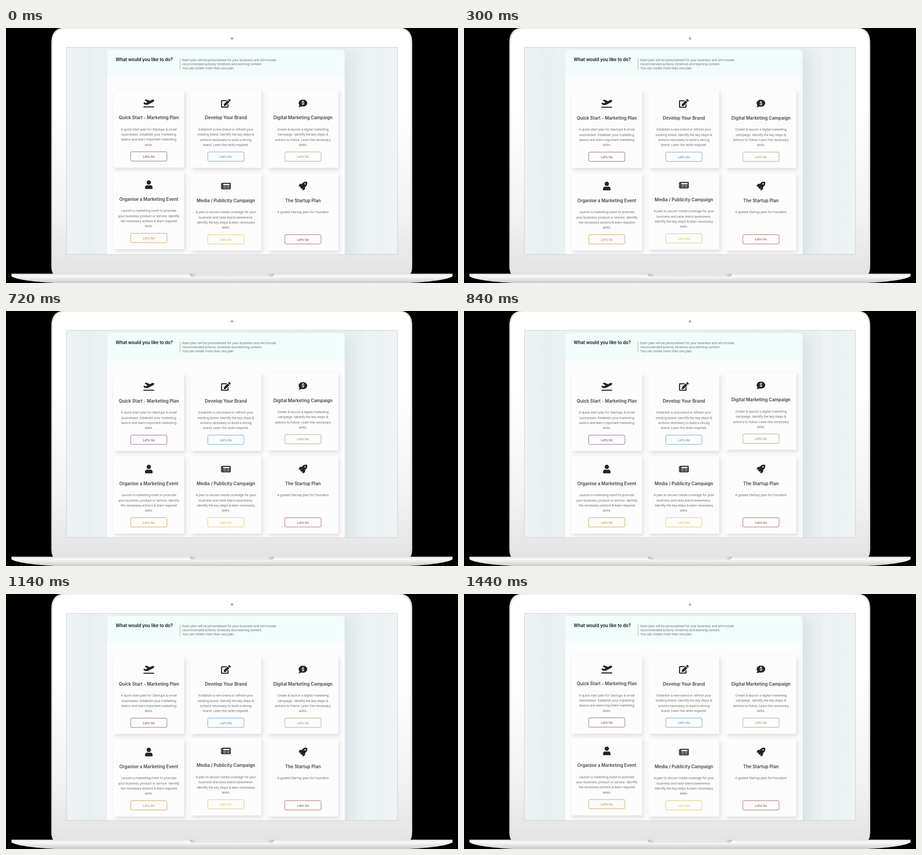
An HTML page that plays this animation: 997 px wide and 562 px high, repeating every 1.5 s.

```html
<!DOCTYPE html>
<html lang="en">
<head>
<meta charset="utf-8">
<title>Plan chooser on a laptop</title>
<style>
html, body { margin: 0; width: 100%; height: 100%; overflow: hidden; background: #000; }
svg { display: block; width: 997px; height: 562px; }
text { font-family: Roboto, sans-serif; }
.heading { font: 600 9.75px Inter, sans-serif; fill: #444; }
.body { font-size: 7.45px; font-weight: 300; fill: #333; }
.go { font-size: 7.4px; font-weight: 500; }
.card text { text-anchor: middle; }
.sheet { fill: #fcfcfc; filter: drop-shadow(3px 4px 4px rgba(80, 50, 55, .16)); }
.panel { filter: drop-shadow(12px 8px 14px rgba(90, 120, 130, .13)); }
</style>
</head>
<body>
<svg viewBox="0 0 997 562">
  <defs>
    <linearGradient id="lid" x2="0" y2="1">
      <stop offset=".3" stop-color="#fff"/><stop offset=".75" stop-color="#f3f3f3"/><stop offset="1" stop-color="#e3e3e3"/>
    </linearGradient>
    <linearGradient id="base" x2="0" y2="1">
      <stop stop-color="#e2e2e2"/><stop offset=".25" stop-color="#fafafa"/><stop offset=".45" stop-color="#efefef"/><stop offset="1" stop-color="#c9c9c9"/>
    </linearGradient>
    <linearGradient id="notch">
      <stop stop-color="#bdbdbd"/><stop offset=".08" stop-color="#e6e6e6"/><stop offset=".92" stop-color="#e6e6e6"/><stop offset="1" stop-color="#bdbdbd"/>
    </linearGradient>
    <linearGradient id="wall">
      <stop stop-color="#eff3f5"/><stop offset=".07" stop-color="#e9eff1"/><stop offset=".12" stop-color="#eef2f4"/>
      <stop offset=".9" stop-color="#ebf0f2"/><stop offset=".901" stop-color="#eff3f4"/><stop offset=".95" stop-color="#ecf1f3"/><stop offset="1" stop-color="#f0f4f5"/>
    </linearGradient>
    <clipPath id="screen"><path d="M134 43H863V498.5H134z"/></clipPath>
  </defs>

  <path d="M100 32Q100-1 132-1H864Q896-1 896 32V525Q896 540 889 545H107Q100 540 100 525z" fill="#dedede"/>
  <path d="M103 33Q103 1 134 1H862Q893 1 893 33V526Q893 538 888 543H108Q103 538 103 526z" fill="url(#lid)"/>
  <circle cx="498.5" cy="23" r="3.2" fill="#ddd"/>
  <circle cx="498.5" cy="23" r="1.8" fill="#8c8c8c"/>
  <path d="M12 541.5H985V547Q972 557 890 562H107Q25 557 12 547z" fill="url(#base)"/>
  <path d="M405 541.5H591Q591 548 584 548H412Q405 548 405 541.5z" fill="url(#notch)"/>

  <path d="M133.5 42.5H863.5V499H133.5z" fill="url(#wall)" stroke="#c9cfd0"/>
  <g clip-path="url(#screen)">
    <path class="panel" d="M223 520V58Q223 48 233 48H737Q747 48 747 58V520z" fill="#fcfcfc"/>
    <path d="M223 108V58Q223 48 233 48H737Q747 48 747 58V108z" fill="#f2fcfb"/>
    <text class="heading" x="242" y="73" style="fill:#161616">What would you like to do?</text>
    <path d="M384 67V92" stroke="#c99a98"/>
    <g class="body">
      <text x="389" y="72.6">Each plan will be personalised for your business and will include</text>
      <text x="389" y="82">recommended actions, timelines and learning content.</text>
      <text x="389" y="91.4">You can create more than one plan.</text>
    </g>
    <g id="cards"></g>
  </g>
</svg>
<script>
const LOOP = 1500;

// Icons are drawn on a 512-unit high grid.
const bar = (x, y, w, h) => `M${x} ${y}v${h}h${w}v${-h}z`;
const icons = {
  plane: [640, 'M624 448H16c-9 0-16 7-16 16v32c0 9 7 16 16 16h608c9 0 16-7 16-16v-32c0-9-7-16-16-16zM80.5 341.3c6.3 6.8 15.1 10.7 24.4 10.7l130.5-.2a66 66 0 0 0 29.6-7.1L556 197c26.800-13.500 50.700-32.900 67-58.300 18.300-28.500 20.300-49.100 13.100-63.700-7.200-14.500-24.700-25.200-58.300-27.400-29.800-2-59.500 5.900-86.200 19.400L393 117 174.400 35a18 18 0 0 0-18-1.100L90.600 67.300c-10.600 5.400-13.200 19.600-5.100 28.500l156.200 98.100-103.200 52.400-72.400-36.500a18 18 0 0 0-16 0L9.900 230.200c-10.400 5.300-13.200 19.100-5.600 28.100z'],
  edit: [576, 'M402.600 83.200l90.200 90.200c3.800 3.800 3.800 10 0 13.800L274.400 405.600l-92.800 10.300c-12.400 1.400-22.900-9.100-21.500-21.500l10.300-92.800L388.800 83.200c3.800-3.800 10-3.800 13.800 0zm162-22.900l-48.800-48.800c-15.200-15.200-39.900-15.200-55.200 0l-35.400 35.400c-3.800 3.800-3.800 10 0 13.800l90.200 90.200c3.800 3.800 10 3.800 13.800 0l35.400-35.400c15.200-15.300 15.200-40 0-55.200zM384 346V448H64V128h230c3 0 6-1 8.300-3.500l40-40c7.600-7.600 2-20.500-8.500-20.500H48C21.500 64 0 85.500 0 112v352c0 26.500 21.500 48 48 48h352c26.500 0 48-21.500 48-48V306c0-10.700-13-16-20.500-8.500l-40 40c-2.200 2.300-3.500 5.300-3.500 8.500z'],
  chat: [512, 'M256 32C115 32 0 125 0 240c0 48 20 92 53 127-14 52-45 85-49 90-9 9-4 23 9 23 62 0 113-25 142-45 31 9 65 13 101 13 141 0 256-93 256-208S397 32 256 32z'],
  user: [448, 'M224 256a128 128 0 1 0 0-256 128 128 0 0 0 0 256zm90 32h-17c-46 21-100 21-146 0h-17C60 288 0 348 0 422v42c0 26 22 48 48 48h352c26 0 48-22 48-48v-42c0-74-60-134-134-134z'],
  news: [576, 'M552 64H88c-13 0-24 11-24 24v8H24c-13 0-24 11-24 24v272c0 31 25 56 56 56h472c26 0 48-22 48-48V88c0-13-11-24-24-24z'
    + bar(48, 144, 16, 256) + bar(128, 128, 384, 80) + bar(128, 256, 176, 32) + bar(336, 256, 176, 32) + bar(128, 352, 176, 32) + bar(336, 352, 176, 32)],
  rocket: [512, 'M505 19c-1-5-7-11-12-12C461 0 435 0 410 0 307 0 245 55 199 128H95c-16 0-36 12-43 26L2.500 253A28 28 0 0 0 0 264a24 24 0 0 0 24 24h104l-23 22c-11 12-13 33 0 46l51 51c11 11 32 13 45 0l23-23V488a24 24 0 0 0 24 24 28 28 0 0 0 11-2.500l98-49.500c15-7 27-26 27-43V313c72-47 128-109 128-211 0-26 0-51-7-83zM384 168a40 40 0 1 1 40-40 40 40 0 0 1-40 40z'],
};

// lift: [time, pixels raised] pairs
const cards = [
  { icon: 'plane', title: 'Quick Start - Marketing Plan', color: '#8d5f88', lift: [[0, .7], [180, 0], [1260, 0], [1440, .6], [LOOP, .7]],
    lines: ['A quick start plan for Startups & small', 'businesses. Establish your marketing', 'basics and learn important marketing', 'skills.'] },
  { icon: 'edit', title: 'Develop Your Brand', color: '#6ba3c0', lift: [[0, .3], [180, 0], [1260, 0], [LOOP, .3]],
    lines: ['Establish a new brand or refresh your', 'existing brand. Identify the key steps &', 'actions necessary to build a strong', 'brand. Learn the skills required.'] },
  { icon: 'chat', title: 'Digital Marketing Campaign', color: '#98ae7e', lift: [[0, .3], [180, 0], [600, 0], [840, 2.5], [1020, 0], [1260, 0], [LOOP, .3]],
    lines: ['Create & launch a digital marketing', 'campaign. Identify the key steps &', 'actions to follow. Learn the necessary', 'skills.'] },
  { icon: 'user', title: 'Organise a Marketing Event', color: '#c5a052', lift: [[0, 3], [60, 3], [270, 0], [1140, 0], [1260, 1.3], [1440, 2.6], [LOOP, 3]],
    lines: ['Launch a marketing event to promote', 'your business, product or service. Identify', 'the necessary actions & learn required', 'skills.'] },
  { icon: 'news', title: 'Media / Publicity Campaign', color: '#d8ca69', lift: [[0, 0], [60, 0], [240, 2.5], [300, 2], [480, 0], [900, 0], [1110, 2.5], [1320, 0], [LOOP, 0]],
    lines: ['A plan to secure media coverage for your', 'business and raise brand awareness.', 'Identify the key steps & learn necessary', 'skills.'] },
  { icon: 'rocket', title: 'The Startup Plan', color: '#a26462', lift: [[0, 0], [300, 0], [480, 3], [540, 2.5], [700, 0], [LOOP, 0]],
    lines: ['A guided Startup plan for Founders'] },
];

const escapeText = s => s.replace(/&/g, '&amp;');

function cardMarkup({ icon, title, color, lines }) {
  const [width, path] = icons[icon];
  const dollar = icon === 'chat' ? '<text x="256" y="345" font-size="300" font-weight="700" fill="#fcfcfc">$</text>' : '';
  const body = lines.map((line, i) => `<text class="body" x="78" y="${88.3 + i * 11.35}">${escapeText(line)}</text>`).join('');
  return `<g class="card">
    <rect class="sheet" width="156" height="170.500"/>
    <g transform="translate(78 28.300) scale(.0371) translate(${-width / 2} -256)" fill="#212529"><path d="${path}" fill-rule="evenodd"/>${dollar}</g>
    <text class="heading" x="78" y="63.800">${title}</text>${body}
    <rect x="38" y="135.500" width="80" height="20.500" rx="3" fill="none" stroke="${color}"/>
    <text class="go" x="78" y="148.500" fill="${color}">Let's Go</text>
  </g>`;
}

const group = document.getElementById('cards');
group.innerHTML = cards.map(cardMarkup).join('');

function valueAt(keys, t) {
  const next = keys.findIndex(([time]) => time > t);
  const [t0, v0] = keys[next - 1], [t1, v1] = keys[next];
  const u = (t - t0) / (t1 - t0);
  return v0 + (v1 - v0) * u * u * (3 - 2 * u);
}

function draw() {
  const t = performance.now() % LOOP;
  cards.forEach((card, i) => {
    const x = 237 + i % 3 * 170, y = i < 3 ? 138 : 320;
    group.children[i].setAttribute('transform', `translate(${x} ${y - valueAt(card.lift, t)})`);
  });
  requestAnimationFrame(draw);
}
draw();
</script>
</body>
</html>
```
